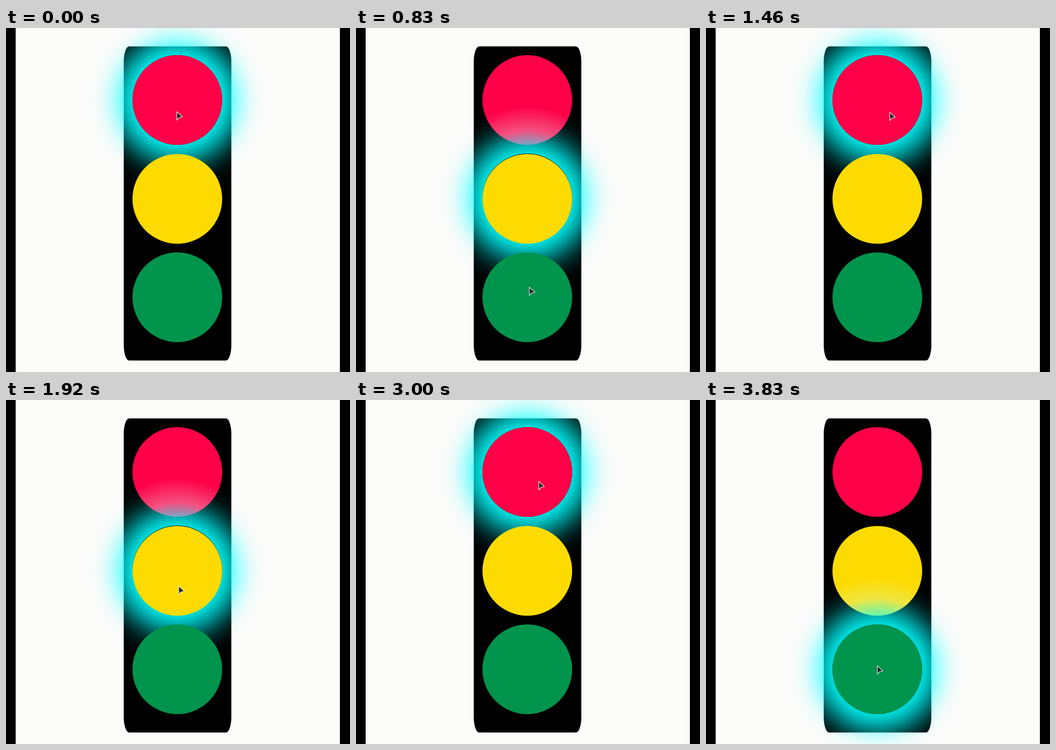
Animation of 748x748 px, one loop 3870 ms. Source, as an HTML page:

```html
<!DOCTYPE html>
<html>
<head>
<meta charset="utf-8">
<title>Traffic light</title>
<style>
  html, body { margin: 0; height: 100%; overflow: hidden; background: #fcfcfb; }
  #stage { position: relative; width: 748px; height: 748px; overflow: hidden; box-sizing: border-box;
    border: solid #000; border-width: 0 22px 0 21px; }
  #stage * { position: absolute; }
  #box { left: 235px; top: 40px; width: 233.5px; height: 682.5px; border-radius: 5%; background: #000; overflow: hidden; }
  .disc { left: 253.5px; width: 195px; height: 195px; border-radius: 50%; }
  .glow { box-shadow: 0 0 62px 28px #0ff; }
  /* The same light looks stronger on the dark housing */
  #box .glow { left: 18.5px; margin-top: -40px; box-shadow: 0 0 64px 38px #0ff; }
  #red { top: 58.7px; background: #ff0048; }
  #yellow { top: 273.7px; background: #fedb00; }
  #green { top: 488px; background: #00944c; }
  /* Light spilling up from the lamp below */
  #red.spill { background: radial-gradient(circle at 50% 312px, #78a5c8 117px, #f4507f 148px, #ff0048 200px); }
  #yellow.spill { background: radial-gradient(circle at 50% 312px, #69f5af 117px, #f0e640 156px, #fedb00 200px); }
  #cursor { left: -21px; top: 0; overflow: visible; }
</style>
</head>
<body>
<div id="stage">
  <div class="glow disc"></div>
  <div id="box"><div class="glow disc"></div></div>
  <div id="red" class="disc"></div>
  <div id="yellow" class="disc"></div>
  <div id="green" class="disc"></div>
  <svg id="cursor" width="20" height="26">
    <path d="M.5 1V19.5L5 14L12.5 12.3Z" fill="#222" stroke="#f4f4f4" stroke-width="1.2" stroke-linejoin="round"/>
  </svg>
</div>
<script>
const LOOP = 3870;
const RED = 0, YELLOW = 1, GREEN = 2;
const [red, yellow, cursor] = ['red', 'yellow', 'cursor'].map(id => document.getElementById(id));
const glows = document.querySelectorAll('.glow');

// Where the pointer turns: time, x, y
const turns = [
  [0, 371, 181], [960, 381, 580], [1460, 399, 182], [2320, 374, 580], [3015, 397, 176], [3675, 372, 577]
];

const easeInOut = k => (1 - Math.cos(Math.PI * k)) / 2;
const easeOut = k => 1 - (1 - k) ** 4;

// Smooth bowed strokes down, quick strokes up; the light trails the pointer
function stateAt(t) {
  const next = turns.findIndex(p => p[0] > t);
  const i = next < 0 ? turns.length - 1 : next;
  const [t0, x0, y0] = turns[i - 1], [t1, x1, y1] = turns[i];
  const k = Math.min(1, (t - t0) / (t1 - t0));
  const down = y1 > y0;
  const e = down ? easeInOut(k) : easeOut(k);
  const bow = down ? 10 * Math.sin(Math.PI * k) : 0;
  const lit = down ? (k < 0.5 ? RED : k < 1 ? YELLOW : GREEN) : (k < 0.65 ? GREEN : RED);
  return { x: x0 + (x1 - x0) * e - bow, y: y0 + (y1 - y0) * e, lit };
}

function draw(t) {
  const { x, y, lit } = stateAt(t);
  for (const glow of glows) glow.style.top = 58.7 + 214.65 * lit + 'px';
  red.classList.toggle('spill', lit === YELLOW);
  yellow.classList.toggle('spill', lit === GREEN);
  cursor.style.transform = `translate(${x}px, ${y}px)`;
}

const start = performance.now();
function tick() {
  draw((performance.now() - start) % LOOP);
  requestAnimationFrame(tick);
}
tick();
</script>
</body>
</html>
```
